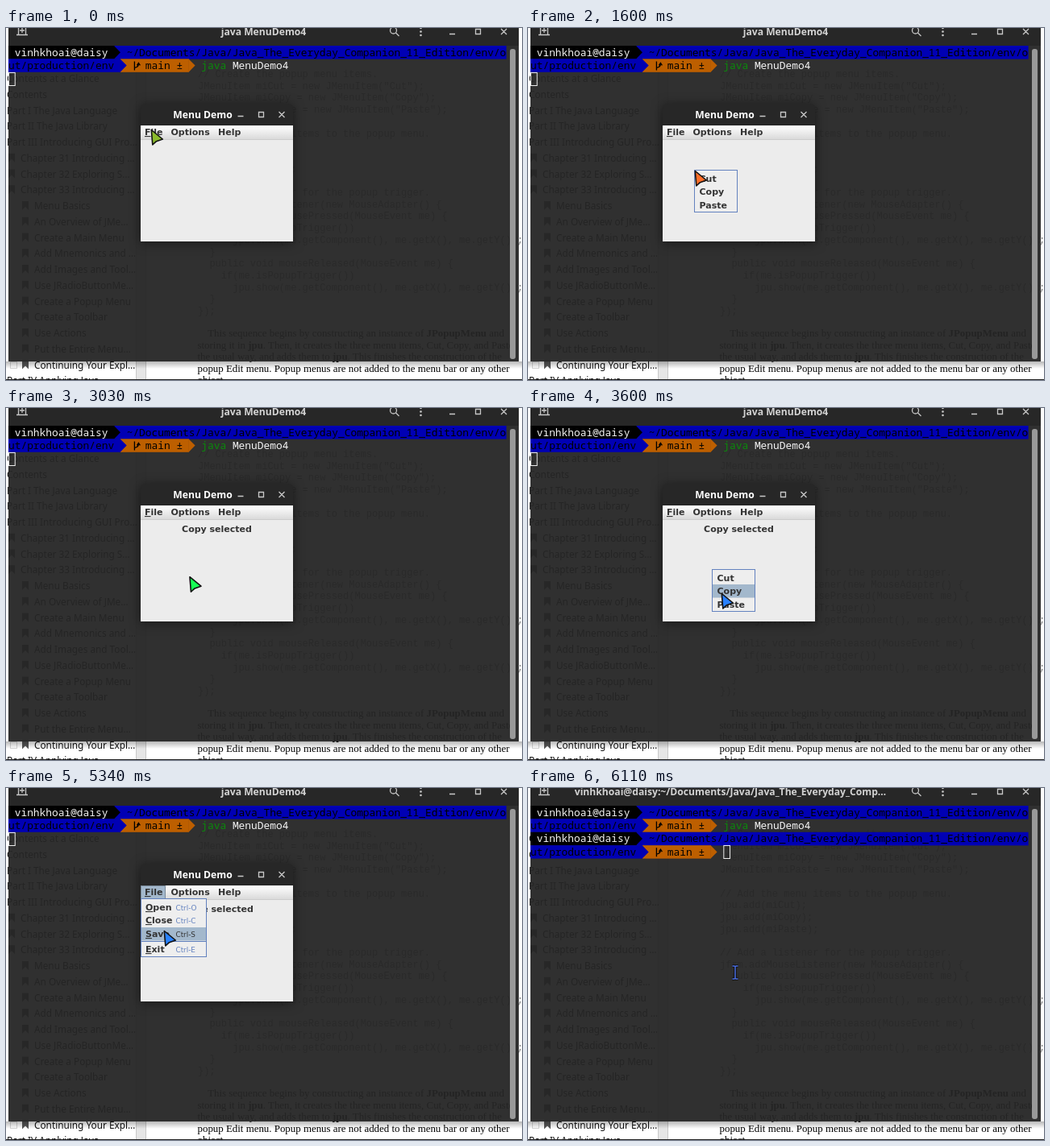
An HTML page for the animation above (6.18 s loop, 640x437 px).

```html
<!DOCTYPE html>
<html lang="en">
<head>
<meta charset="utf-8">
<title>Menu Demo</title>
<style>
  html, body { margin: 0; width: 100%; height: 100%; overflow: hidden; background: #fff; }
  svg { display: block; width: 640px; height: 437px; }
  text { white-space: pre; }
  .side { font: 11.8px "Noto Sans", "Open Sans", sans-serif; fill: #111; }
  .code { font: 12px "Liberation Mono", monospace; fill: #777; }
  .prose { font: 12.9px "Liberation Serif", serif; fill: #000; }
  .title { font: bold 12.15px "Noto Sans", "Open Sans", sans-serif; fill: #d2d2d2; text-anchor: middle; }
  .term { font: 12.87px "Noto Sans Mono", monospace; fill: #000; }
  .ui { font: bold 11px "DejaVu Sans", sans-serif; fill: #333; }
  .key { font: 8.8px "DejaVu Sans", sans-serif; fill: #6382bf; }
  .key.on { fill: #333; }
  .icon { fill: none; stroke: #c8c8c8; stroke-width: 1.3; }
  .window { filter: drop-shadow(0 2px 7px rgba(0, 0, 0, .5)); }
  .pick { fill: #a3b8cc; }
  .frame { fill: #eee; stroke: #6382bf; }
</style>
</head>
<body>
<svg id="stage" viewBox="0 0 640 437"></svg>
<script>
const LOOP = 6180;
const COL = 7.72, ROW = 16.4;
const USER = 'vinhkhoai@daisy';
const FOLDER = '~/Documents/Java/Java_The_Everyday_Companion_11_Edition';

const text = (x, y, cls, s, more = '') => `<text x="${x}" y="${y}" class="${cls}" ${more}>${s}</text>`;
const rect = (x, y, w, h, more = '') => `<rect x="${x}" y="${y}" width="${w}" height="${h}" ${more}/>`;
const path = (d, more = 'class="icon"') => `<path d="${d}" ${more}/>`;
const group = (id, body, more = '') => `<g id="${id}" ${more}>${body}</g>`;
const mnemonic = s => `<tspan text-decoration="underline">${s[0]}</tspan>${s.slice(1)}`;

function page() {
  const items = [
    'Contents at a Glance', 'Contents', 'Part I The Java Language', 'Part II The Java Library',
    'Part III Introducing GUI Pro…', 'Chapter 31 Introducing …', 'Chapter 32 Exploring S…',
    'Chapter 33 Introducing …', 'Menu Basics', 'An Overview of JMe…', 'Create a Main Menu',
    'Add Mnemonics and …', 'Add Images and Tool…', 'Use JRadioButtonMe…', 'Create a Popup Menu',
    'Create a Toolbar', 'Use Actions', 'Put the Entire Menu…', 'Continuing Your Expl…', 'Part IV Applying Java'
  ];
  const show = '      jpu.show(me.getComponent(), me.getX(), me.getY());';
  const code = [
    '// Create the popup menu items.', 'JMenuItem miCut = new JMenuItem("Cut");',
    'JMenuItem miCopy = new JMenuItem("Copy");', 'JMenuItem miPaste = new JMenuItem("Paste");', '',
    '// Add the menu items to the popup menu.', 'jpu.add(miCut);', 'jpu.add(miCopy);', 'jpu.add(miPaste);', '',
    '// Add a listener for the popup trigger.', 'jfrm.addMouseListener(new MouseAdapter() {',
    '  public void mousePressed(MouseEvent me) {', '    if(me.isPopupTrigger())', show, '  }',
    '  public void mouseReleased(MouseEvent me) {', '    if(me.isPopupTrigger())', show, '  }', '});'
  ];
  const bold = s => `<tspan font-weight="bold">${s}</tspan>`;
  const prose = [
    `    This sequence begins by constructing an instance of ${bold('JPopupMenu')} and`,
    `storing it in ${bold('jpu')}. Then, it creates the three menu items, Cut, Copy, and Paste,`,
    `the usual way, and adds them to ${bold('jpu')}. This finishes the construction of the`,
    'popup Edit menu. Popup menus are not added to the menu bar or any other', 'object.'
  ];
  const mark = 'fill="#555"';
  return rect(0, 0, 640, 437, 'fill="#fff"') + rect(161, 0, 12, 437, 'fill="#e6e6e6"') +
    path('M161.5 0V437M173.5 0V437', 'stroke="#c8c8c8"') +
    items.map((s, i) => {
      const y = 67 + i * 19.75;
      const depth = i > 18 || i < 5 ? 0 : i < 8 ? 1 : 2;
      const x = depth * 17 + 1;
      const flag = depth ? path(`M${x - 15} ${y - 10}h8v11l-4-4l-4 4z`, mark) : '';
      return flag + text(x, y, 'side', s);
    }).join('') +
    rect(5.5, 414.5, 8, 8, 'fill="none" stroke="#aaa" stroke-dasharray="1 1"') +
    code.map((s, i) => text(238, 61 + i * 14.7, 'code', s)).join('') +
    prose.map((s, i) => text(237.5, 383 + i * 14.6, 'prose', s)).join('') +
    rect(0, 436, 640, 1, 'fill="#222"');
}

function prompt(y) {
  const at = c => 3 + c * COL;
  const base = y + 12.5;
  const arrow = (c, top, color) =>
    path(`M${at(c) - .3} ${top}L${at(c + 1)} ${top + ROW / 2}L${at(c) - .3} ${top + ROW}z`, `fill="${color}"`);
  const low = y + ROW;
  const g = at(20) + 2;
  return rect(3, y, 80 * COL, ROW + .2, 'fill="#0000b4"') +
    rect(3, y, 17 * COL, ROW) + arrow(17, y, '#000') +
    rect(3, low, 18 * COL, ROW, 'fill="#0000b4"') +
    rect(at(18), low, 11 * COL, ROW, 'fill="#bd5f00"') +
    arrow(18, low, '#0000b4') + arrow(29, low, '#bd5f00') +
    text(at(1), base, 'term', USER, 'style="fill:#f4f4f4"') +
    text(at(19), base, 'term', FOLDER + '/env/o') +
    text(3, base + ROW, 'term', 'ut/production/env') +
    path(`M${g} ${low + 3}v11M${g} ${low + 11}q5 -1 5 -5m-2 2l2 -3l2 3`, 'fill="none" stroke="#000" stroke-width="1.3"') +
    text(at(22), base + ROW, 'term', 'main ±');
}

function terminal() {
  return rect(3, 22, 633, 392, 'fill="rgba(37,37,37,.95)"') +
    rect(3, -5, 633, 27, 'fill="#272727"') +
    rect(625, 26, 7, 385, 'rx="3" fill="#999"') +
    text(319.5, 9, 'title', '', 'id="caption"') +
    path('M15.500 -2v10.500M24.500 -2v10.500M13 8.500h14M20 0v6M17 3h6') +
    '<circle cx="480.500" cy="3" r="4" class="icon"/>' + path('M483.500 6l4 4') +
    [0, 4.5, 9].map(y => `<circle cx="514.500" cy="${y}" r="1.300" fill="#c8c8c8"/>`).join('') +
    path('M550 7.500h7M582.500 1.500h6v6h-6zM614 1l7 7M621 1l-7 7') +
    prompt(22) +
    text(3 + 31 * COL, 34.5 + ROW, 'term', '<tspan fill="#0b8a0b">java</tspan> MenuDemo4', 'style="fill:#f4f4f4"') +
    group('again', prompt(22 + 2 * ROW)) +
    rect(.5, .5, COL, 16, 'id="caret" fill="none" stroke="#eee"');
}

function demo() {
  return group('demo',
    path('M167 265V100q0 -6 6 -6h177q6 0 6 6V265z', 'fill="#272727"') +
    text(244, 112, 'title', 'Menu Demo', 'style="fill:#fff"') +
    path('M287.500 109.500h7M313.500 104.500h6v6h-6zM338.500 104l7 7M345.500 104l-7 7') +
    rect(167, 121, 189, 144, 'fill="#ececec"') +
    rect(167, 121, 189, 17, 'fill="url(#bar)"') + rect(167, 138, 189, 1, 'fill="#ccc"') +
    rect(167.5, 121.5, 30, 16, 'id="fileTab" class="pick" stroke="#7a8a99"') +
    text(172, 133, 'ui', mnemonic('File')) + text(204.5, 133, 'ui', 'Options') + text(263, 133, 'ui', 'Help') +
    text(261.5, 154, 'ui', '', 'id="label" text-anchor="middle"') +
    group('fileMenu',
      rect(167.5, 137.5, 81, 72, 'class="frame"') +
      rect(168, 0, 80, 16.5, 'id="filePick" class="pick"') +
      path('M168 190.500h80', 'stroke="#6382bf"') +
      ['Open', 'Close', 'Save', 'Exit'].map((s, i) => {
        const y = [152, 168, 185, 204][i];
        return text(173, y, 'ui', mnemonic(s)) + text(210.5, y, 'key', 'Ctrl-' + 'OCSE'[i]);
      }).join('')) +
    group('popup',
      rect(.5, .5, 53, 52, 'class="frame"') +
      rect(1, 0, 52, 16.5, 'id="popPick" class="pick"') +
      ['Cut', 'Copy', 'Paste'].map((s, i) => text(6.5, 15 + i * ROW, 'ui', s)).join('')),
    'class="window"');
}

function beam() {
  const d = 'M-3.500 -8h2.500l1 1l1 -1h2.500M0 -7v14M-3.500 8h2.500l1 -1l1 1h2.500';
  const line = (color, w) => path(d, `fill="none" stroke="${color}" stroke-width="${w}"`);
  return group('beam', line('#111', 3.6) + line('#4a6ee0', 1.5));
}

const stage = document.getElementById('stage');
stage.innerHTML = `<defs>
    <linearGradient id="bar" x2="0" y2="1"><stop stop-color="#fff"/><stop offset="1" stop-color="#dadada"/></linearGradient>
    <linearGradient id="fall" x2="0" y2="1"><stop stop-color="#000" stop-opacity=".28"/><stop offset="1" stop-color="#000" stop-opacity="0"/></linearGradient>
  </defs>` + page() + rect(0, 414, 640, 9, 'fill="url(#fall)"') + terminal() + demo() +
  path('M1.300 1.500L2.800 20L7.500 15.700L15.300 13z', 'id="arrow" stroke="#111" stroke-width="1.600" stroke-linejoin="round"') +
  beam();

const el = {};
stage.querySelectorAll('[id]').forEach(e => el[e.id] = e);
const keys = stage.querySelectorAll('.key');

// time, x, y
const moves = [
  [0, 179, 125], [60, 179, 125], [900, 193, 160], [970, 193, 160], [1250, 206, 176], [1700, 206, 176],
  [1950, 215, 186], [2500, 215, 186], [2850, 226, 212], [2960, 226, 212], [3150, 228, 200], [3280, 228, 200],
  [3600, 239, 229], [3680, 239, 229], [3850, 243, 242], [4100, 243, 242], [4750, 176, 131], [4900, 176, 131],
  [5340, 195, 176], [5410, 195, 176], [5650, 196, 196], [5860, 196, 196], [6110, 257, 229], [LOOP, 257, 229]
];
// time, hue, saturation, lightness
const tints = [
  [0, 80, 62, 45], [900, 3, 100, 66], [2310, 36, 100, 50], [3600, 215, 100, 58],
  [4750, 396, 100, 50], [5340, 575, 100, 58], [LOOP, 600, 90, 58]
];
// from, to, x, y
const popups = [[1300, 2040, 206, 176], [2520, 2960, 215, 186], [3210, 3940, 228, 200]];
const labels = [[3940, 'Paste selected'], [2960, 'Copy selected'], [2040, 'Cut selected'], [0, '']];

const smooth = k => k * k * (3 - 2 * k);
function sample(rows, t, ease = k => k) {
  const i = Math.max(1, rows.findIndex(r => r[0] > t));
  const a = rows[i - 1], b = rows[i];
  const k = ease((t - a[0]) / (b[0] - a[0]));
  return a.slice(1).map((v, n) => v + (b[n + 1] - v) * k);
}
const show = (e, on) => e.setAttribute('display', on ? 'inline' : 'none');
const place = (e, x, y) => e.setAttribute('transform', `translate(${x} ${y})`);
function setText(e, s) { if (e.textContent !== s) e.textContent = s; }
function pick(e, tops, y) {
  const row = tops.findIndex(v => y >= v && y < v + 16.6);
  show(e, row >= 0);
  if (row >= 0) e.setAttribute('y', tops[row]);
  return row;
}

function draw(t) {
  const [x, y] = sample(moves, t, smooth);
  const [h, s, l] = sample(tints, t);
  const open = t < 5880, prompted = t >= 5960;

  show(el.demo, open);
  setText(el.label, labels.find(r => t >= r[0])[1]);

  const menu = t >= 4880 && open;
  show(el.fileTab, menu);
  show(el.fileMenu, menu);
  const row = pick(el.filePick, [139, 156, 173, 192], y);
  keys.forEach((k, i) => k.classList.toggle('on', i === row));

  const pop = popups.find(p => t >= p[0] && t < p[1]);
  show(el.popup, pop);
  if (pop) {
    place(el.popup, pop[2], pop[3]);
    pick(el.popPick, [2, 19, 35.5], y - pop[3]);
  }

  setText(el.caption, prompted ? USER + ':' + FOLDER.slice(0, 38) + 'p…' : 'java MenuDemo4');
  el.caption.setAttribute('x', prompted ? 251 : 319.5);
  show(el.again, prompted);
  if (prompted) place(el.caret, 3 + 31 * COL, 71);
  else place(el.caret, 3, 55);

  show(el.arrow, !prompted);
  show(el.beam, prompted);
  place(el.arrow, x, y);
  place(el.beam, x, y);
  el.arrow.setAttribute('fill', `hsl(${h % 360} ${s}% ${l}%)`);
}

function tick() {
  draw(performance.now() % LOOP);
  requestAnimationFrame(tick);
}
tick();
</script>
</body>
</html>
```
